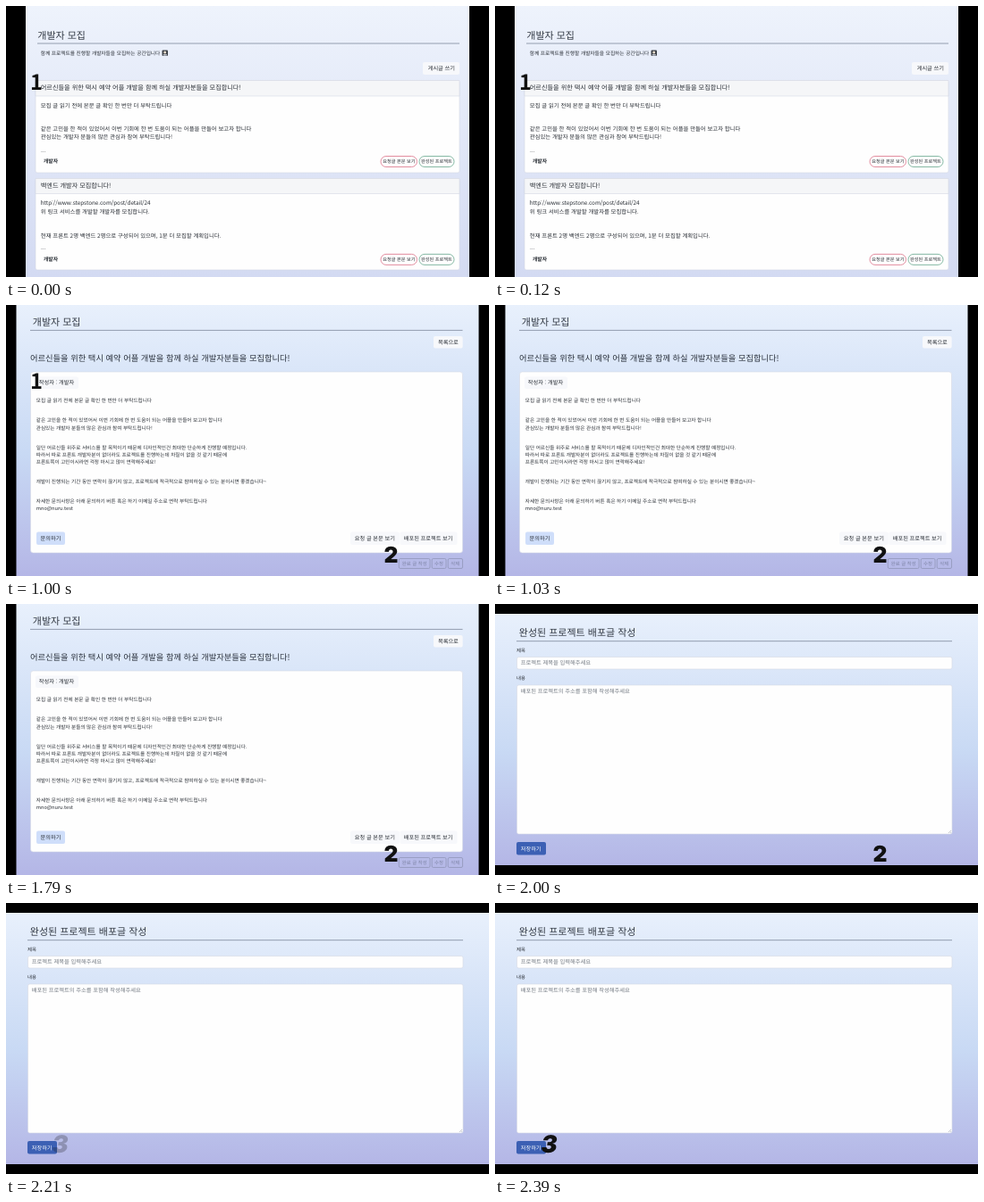
Animation of 540x304 px, one loop 3.06 s. Source, as an HTML page:

```html
<!DOCTYPE html>
<html lang="ko">
<head>
<meta charset="utf-8">
<title>개발자 모집</title>
<style>
  html, body { margin: 0; width: 100%; height: 100%; overflow: hidden; background: #000; }
  svg { display: block; width: 100vw; height: 100vh; }
  text {
    font-family: "Noto Sans CJK KR", "Noto Sans CJK", sans-serif;
    fill: #282d34;
    text-rendering: geometricPrecision;
  }
  .title { font-size: 11px; fill: #323943; }
  .lead { font-size: 9.28px; fill: #2c333e; }
  .head { font-size: 7.15px; }
  .body { font-size: 6.36px; }
  .sub { font-size: 5.7px; }
  .fine { font-size: 5.61px; }
  .btn { font-size: 6.2px; }
  .tag { font-size: 5.8px; font-weight: 700; }
  .pill { font-size: 5.2px; }
  .label { font-size: 5.4px; }
  .hint { font-size: 6.25px; fill: #747b84; }
  .rule { stroke: #8a93a6; stroke-width: .9; }
  .card { fill: #fefefe; stroke: #d5d9e4; stroke-width: .6; }
  .light { fill: #f7f8fb; }
  .faint rect { fill: none; stroke: #8d92b4; stroke-width: .7; }
  .faint text { font-size: 5.4px; fill: #7e84a6; }
  .num { font: 900 24.7px Inter, sans-serif; fill: #111; }
  #n1 text { font: 700 23.6px "Noto Sans CJK KR", "Noto Sans CJK", sans-serif; }
  #n3 text { font-size: 27px; font-style: italic; }

  /* 3060 ms loop: cuts at 1000 and 2000, numerals linger 30 ms */
  .page, #n1, #n2, #n3 { animation: 3060ms step-end infinite; }
  #list { animation-name: list; }
  #post { animation-name: post; }
  #form { animation-name: form; }
  #n1 { animation-name: one; }
  #n2 { animation-name: two; }
  #n3 { animation-name: three; }
  @keyframes list { 0% { visibility: visible } 32.6797%, 100% { visibility: hidden } }
  @keyframes post { 0% { visibility: hidden } 32.6797% { visibility: visible } 65.3595%, 100% { visibility: hidden } }
  @keyframes form { 0% { visibility: hidden } 65.3595%, 100% { visibility: visible } }
  @keyframes one { 0% { visibility: visible } 33.6601%, 100% { visibility: hidden } }
  @keyframes two { 0% { visibility: hidden } 32.6797% { visibility: visible } 66.3399%, 100% { visibility: hidden } }
  @keyframes three {
    0% { opacity: 0 }
    70.2614% { opacity: 0; animation-timing-function: steps(8, end) }
    78.1046%, 100% { opacity: 1 }
  }
</style>
</head>
<body>
<svg viewBox="0 0 540 304" preserveAspectRatio="none">
  <defs>
    <linearGradient id="pale" x2="0" y2="1">
      <stop stop-color="#eef3fc"/>
      <stop offset="1" stop-color="#d3daf2"/>
    </linearGradient>
    <linearGradient id="sky" x2="0" y2="1">
      <stop stop-color="#e8f0fc"/>
      <stop offset=".55" stop-color="#c8d9f4"/>
      <stop offset="1" stop-color="#b4b6e6"/>
    </linearGradient>
    <g id="foot">
      <text class="body" x="39" y="-10">...</text>
      <text class="tag" x="42" y="2.2">개발자</text>
      <g fill="#fefefe" stroke-width=".8">
        <rect x="419" y="-5" width="40.5" height="12" rx="6" stroke="#dc7288"/>
        <rect x="462" y="-5" width="39" height="12" rx="6" stroke="#68a98f"/>
      </g>
      <text class="pill" x="421.3" y="2.9">요청글 본문 보기</text>
      <text class="pill" x="464" y="2.9">완성된 프로젝트</text>
    </g>
  </defs>

  <rect width="540" height="304"/>

  <g id="list" class="page">
    <rect x="22" width="496" height="304" fill="url(#pale)"/>
    <text class="title" x="35.3" y="36.5">개발자 모집</text>
    <path class="rule" d="M35 42H507"/>
    <text class="sub" x="38.8" y="55.2">함께 프로젝트를 진행할 개발자들을 모집하는 공간입니다</text>
    <rect x="174.5" y="49.5" width="6.5" height="6.5" rx="1" fill="#3c4046"/>
    <circle cx="177.7" cy="52.1" r="1.5" fill="#e4d9c8"/>
    <rect x="175.8" y="54" width="4" height="1.7" fill="#b9bec8"/>
    <rect class="light" x="466" y="63" width="41" height="14" rx="2"/>
    <text class="btn" x="471.7" y="72.4">게시글 쓰기</text>

    <rect class="card" x="33" y="83.5" width="474" height="103.5" rx="2"/>
    <path fill="#f5f6f8" stroke="#d5d9e4" stroke-width=".6" d="M33 101V83.5H507V101Z"/>
    <text class="head" x="38.8" y="94.3">어르신들을 위한 택시 예약 어플 개발을 함께 하실 개발자분들을 모집합니다!</text>
    <g class="body">
      <text x="38.8" y="113.5">모집 글 읽기 전에 본문 글 확인 한 번만 더 부탁드립니다</text>
      <text x="38.8" y="139.5">같은 고민을 한 적이 있었어서 이번 기회에 한 번 도움이 되는 어플을 만들어 보고자 합니다</text>
      <text x="38.8" y="149.4">관심있는 개발자 분들의 많은 관심과 참여 부탁드립니다!</text>
    </g>
    <use href="#foot" y="173.5"/>

    <rect class="card" x="33" y="193.5" width="474" height="102.5" rx="2"/>
    <path fill="#f5f6f8" stroke="#d5d9e4" stroke-width=".6" d="M33 210.5V193.5H507V210.5Z"/>
    <text class="head" x="38.8" y="204.3">백엔드 개발자 모집합니다!</text>
    <g class="body">
      <text x="38.8" y="223.3" letter-spacing="-.04">http://www.stepstone.com/post/detail/24</text>
      <text x="38.8" y="233.4">위 링크 서비스를 개발할 개발자를 모집합니다.</text>
      <text x="38.8" y="259.5">현재 프론트 2명 백엔드 2명으로 구성되어 있으며, 1분 더 모집할 계획입니다.</text>
    </g>
    <use href="#foot" y="283.4"/>
  </g>

  <g id="post" class="page">
    <rect x="11.5" width="517" height="304" fill="url(#sky)"/>
    <text class="title" x="29.8" y="22.9">개발자 모집</text>
    <path class="rule" d="M27 28.4H510.5"/>
    <rect class="light" x="478" y="35" width="32.6" height="13.5" rx="2"/>
    <text class="btn" x="483" y="44.1">목록으로</text>
    <text class="lead" x="27" y="63.4">어르신들을 위한 택시 예약 어플 개발을 함께 하실 개발자분들을 모집합니다!</text>
    <rect class="card" x="27.5" y="75" width="483" height="203" rx="3"/>
    <rect class="light" x="33" y="80.5" width="48" height="13.5" rx="2"/>
    <text class="btn" x="36.8" y="89.4">작성자 : 개발자</text>
    <g class="fine">
      <text x="33.8" y="109.2">모집 글 읽기 전에 본문 글 확인 한 번만 더 부탁드립니다</text>
      <text x="33.8" y="131.2">같은 고민을 한 적이 있었어서 이번 기회에 한 번 도움이 되는 어플을 만들어 보고자 합니다</text>
      <text x="33.8" y="139.5">관심있는 개발자 분들의 많은 관심과 참여 부탁드립니다!</text>
      <text x="33.8" y="161.8">일단 어르신들 위주로 서비스를 할 목적이기 때문에 디자인적인건 최대한 단순하게 진행할 예정입니다.</text>
      <text x="33.8" y="169.9">따라서 따로 프론트 개발자분이 없더라도 프로젝트를 진행하는데 차질이 없을 것 같기 때문에</text>
      <text x="33.8" y="177.8">프론트쪽이 고민이시라면 걱정 마시고 많이 연락해주세요!</text>
      <text x="33.8" y="199.8">개발이 진행되는 기간 동안 연락이 끊기지 않고, 프로젝트에 적극적으로 참여하실 수 있는 분이시면 좋겠습니다~</text>
      <text x="33.8" y="221.6">자세한 문의사항은 아래 문의하기 버튼 혹은 하기 이메일 주소로 연락 부탁드립니다</text>
      <text x="33.8" y="229.6">mno@nuru.test</text>
    </g>
    <rect x="34" y="254.5" width="32" height="14.5" rx="2" fill="#cfdefa"/>
    <text class="btn" x="38.6" y="264.1">문의하기</text>
    <rect class="light" x="385" y="254.5" width="55" height="14.5" rx="2"/>
    <rect class="light" x="440.5" y="254.5" width="64" height="14.5" rx="2"/>
    <text class="btn" x="389.8" y="264">요청 글 본문 보기</text>
    <text class="btn" x="444.8" y="264">배포된 프로젝트 보기</text>
    <g class="faint">
      <rect x="439.3" y="284.5" width="34.7" height="11" rx="1.5"/>
      <rect x="476.2" y="284.5" width="15.8" height="11" rx="1.5"/>
      <rect x="494.2" y="284.5" width="16.3" height="11" rx="1.5"/>
      <text x="442.8" y="292.1">완료 글 작성</text>
      <text x="479" y="292.1">수정</text>
      <text x="497.3" y="292.1">삭제</text>
    </g>
  </g>

  <g id="form" class="page">
    <rect y="11" width="540" height="282" fill="url(#sky)"/>
    <text class="title" x="26.8" y="35.7">완성된 프로젝트 배포글 작성</text>
    <path class="rule" d="M24 41.7H511"/>
    <text class="label" x="24" y="53.6">제목</text>
    <rect class="card" x="24.5" y="59.5" width="486.5" height="13.5" rx="2"/>
    <text class="hint" x="28.8" y="68.4">프로젝트 제목을 입력해주세요</text>
    <text class="label" x="24" y="85.3">내용</text>
    <rect class="card" x="24.5" y="91" width="486.5" height="167" rx="2"/>
    <text class="hint" x="28.8" y="99.9">배포된 프로젝트의 주소를 포함해 작성해주세요</text>
    <path d="M507 257l3-3M509 257l1-1" stroke="#8d929c" stroke-width=".5"/>
    <rect x="24" y="267" width="33" height="14.5" rx="2" fill="#3c60b4"/>
    <text class="btn" x="28.8" y="276.6" style="fill:#fff">저장하기</text>
    <g id="n3"><text class="num" x="51.5" y="279.5">3</text></g>
  </g>

  <g id="n1"><text class="num" x="27" y="94.2">1</text></g>
  <g id="n2"><text class="num" x="422.5" y="289">2</text></g>
</svg>
</body>
</html>
```
